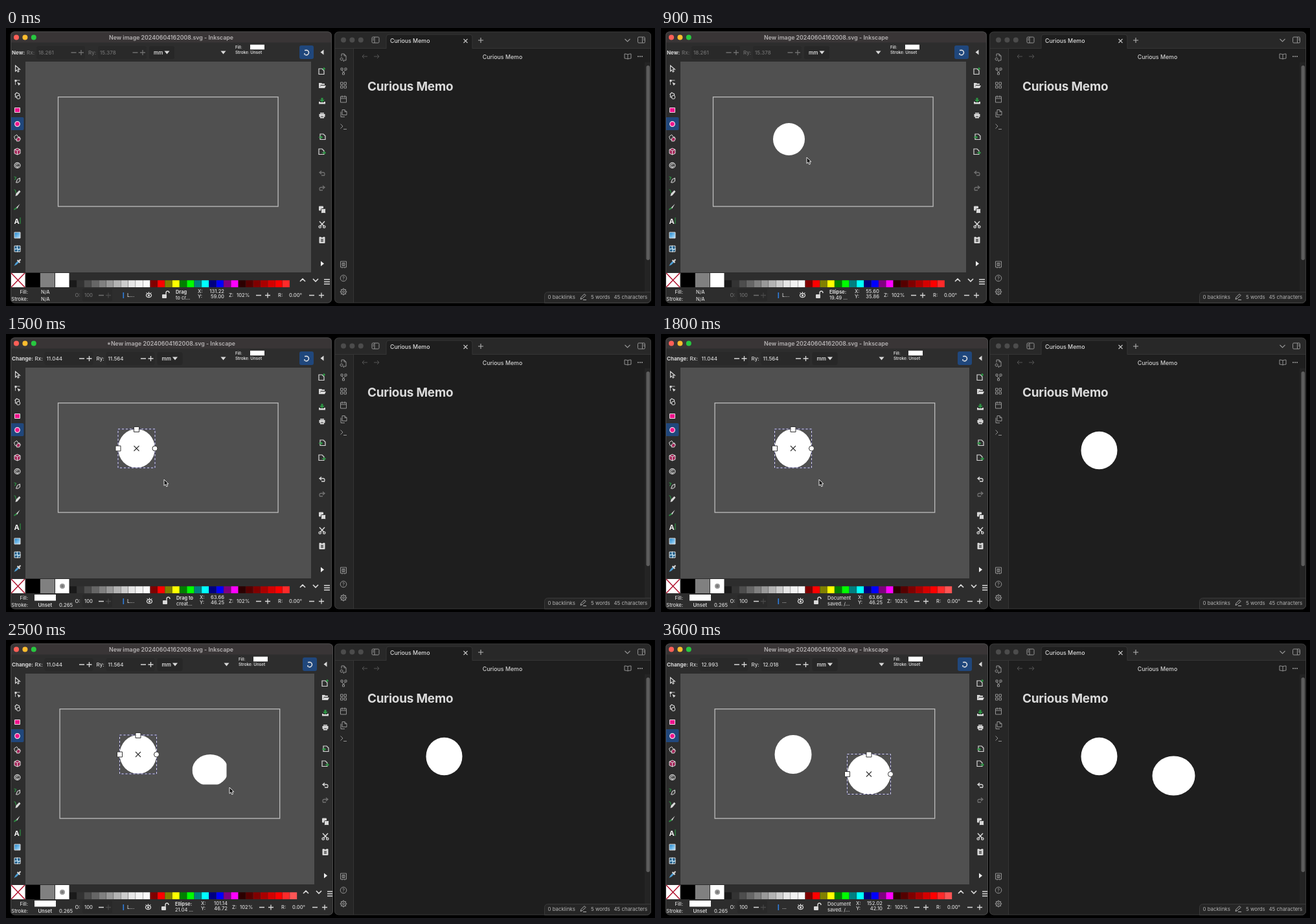
An HTML page with a canvas for the animation above (3.7 s loop, 1002 by 430 pixels).

```html
<!DOCTYPE html>
<html lang="en">
<head>
<meta charset="utf-8">
<title>Live drawing</title>
<style>
html, body { margin: 0; width: 100%; height: 100%; overflow: hidden; background: #000; }
canvas { display: block; width: 1002px; height: 430px; }
</style>
</head>
<body>
<canvas id="stage" width="1002" height="430"></canvas>
<script>
const c = document.getElementById('stage').getContext('2d');
const LOOP = 3700, STEP = 100, MM = 2.58;
const NOTE = 'Curious Memo';
const LIGHT = '#d9d9d9', DIM = '#707070', GREEN = '#2c9142', PINK = '#f0148c';

// Pointer path: [time, x, y]
const path = [
  [100, 345, 222], [200, 245, 172], [300, 172, 146], [400, 172, 146],
  [900, 225, 200], [1000, 233, 210], [1500, 244, 225], [1900, 244, 225],
  [2200, 289, 178], [2500, 345, 228], [2700, 355, 238], [3000, 355, 238],
  [3400, 472, 214], [3500, 492, 208]
];

function pointer(t) {
  if (t < 100) return [418.3, 257.9];
  for (let i = 1; i < path.length; i++) {
    const [t0, x0, y0] = path[i - 1], [t1, x1, y1] = path[i];
    if (t <= t1) {
      const k = (t - t0) / (t1 - t0);
      return [x0 + (x1 - x0) * k, y0 + (y1 - y0) * k];
    }
  }
  return [471.97, 214.3];
}

function box(x, y, w, h, fill, r = 0, stroke) {
  c.beginPath();
  c.roundRect(x, y, w, h, r);
  if (fill) { c.fillStyle = fill; c.fill(); }
  if (stroke) { c.strokeStyle = stroke; c.lineWidth = 1; c.stroke(); }
}

function oval(x, y, rx, ry, fill, stroke, width = 1) {
  c.beginPath();
  c.ellipse(x, y, rx, ry, 0, 0, Math.PI * 2);
  if (fill) { c.fillStyle = fill; c.fill(); }
  if (stroke) { c.strokeStyle = stroke; c.lineWidth = width; c.stroke(); }
}

function draw(d, x, y, stroke, fill, width = 1.2) {
  const p = new Path2D(d);
  c.save();
  c.translate(x, y);
  if (fill) { c.fillStyle = fill; c.fill(p); }
  if (stroke) { c.strokeStyle = stroke; c.lineWidth = width; c.stroke(p); }
  c.restore();
}

function text(s, x, y, size = 7.6, color = LIGHT, weight = 500, align = 'left') {
  c.font = `${weight} ${size}px Inter, sans-serif`;
  c.textAlign = align;
  c.fillStyle = color;
  c.fillText(s, x, y);
}

function plusMinus(x, y, gap, color) {
  draw(`M-4 0H4M${gap - 4} 0h8M${gap} -4v8`, x, y, color, null, 1.3);
}

function trafficLights(x, gap, y, colors) {
  colors.forEach((color, i) => oval(x + i * gap, y, 4, 4, color));
}

function toolIcons() {
  const x = 17.5;
  box(7, 138, 20.5, 20, '#20477c', 2);
  draw('M-3 -5L-3 4L-1 2L1 5L2.5 4L1 1H4Z', x, 63, LIGHT, '#333', 1.1);
  draw('M-4 -4h3v3h-3zM0 0L5 2L2 5Z', x, 84, null, LIGHT);
  draw('M-1 -3H4M-3 -1V4', x, 84, LIGHT, null, .8);
  draw('M-4 -2L-1 -5L3 -3V0M-3 -2V2H0', x, 105, LIGHT);
  oval(x + 1.5, 107, 2.8, 2.8, null, LIGHT);
  box(x - 4, 123.5, 8, 7, PINK, 0, '#f3d9e7');
  oval(x, 148.5, 3.8, 3.8, PINK, '#f3d9e7', 1.3);
  draw('M-1 -5L1 -2L4 -1L2 2L-3 3L-5 -2Z', x, 170, LIGHT, null, 1);
  draw('M1 -1L5 1L3 5H-1L-1 1Z', x, 170, LIGHT, '#a32558', 1);
  draw('M0 -5L4.5 -3V3L0 5L-4.5 3V-3Z', x, 191, LIGHT, '#a32558', 1);
  draw('M-4.5 -3L0 -1L4.5 -3M0 -1V5', x, 191, LIGHT, null, 1);
  oval(x, 212.5, 4.4, 4.1, null, LIGHT, 1.2);
  draw('M2.3 1A2.4 2.4 0 1 1 2 -1.2M0 0L1 .8', x, 212.5, LIGHT, null, 1.1);
  draw('M-5 -4L-2 -3L-4 1', x, 234, GREEN);
  draw('M-2 4L0 -1L4 -3L4 2L1 4Z', x, 235, LIGHT, '#444', 1);
  draw('M-5 -5C-1 -5 -4 0 -1 1', x, 255, GREEN);
  draw('M-3 5L-2 1L3 -4L5 -2L0 4Z', x, 255, null, LIGHT);
  draw('M-3 3L-2 1L4 -5L0 2Z', x, 277, null, LIGHT);
  draw('M-5 4L-1 1', x, 277, GREEN, null, 1.8);
  text('A', x - 5, 302.5, 11, '#f0f0f0', 700);
  draw('M4.5 -5V5', x, 298, GREEN);
  const blend = c.createLinearGradient(13, 316, 22, 325);
  blend.addColorStop(0, '#1681ca');
  blend.addColorStop(1, '#bde6ff');
  box(x - 4.5, 316, 9, 9, blend, 0, LIGHT);
  box(x - 4.5, 337, 9, 9, '#1c5b87', 0, LIGHT);
  draw('M-4 1C-1 -2 1 3 5 0M0 -5C-2 -1 3 0 0 5', x, 341.5, '#d6f1ff');
  draw('M-5 5L-3 1L1 -3L3 -1L-1 3Z', x, 363, null, '#4d9ed4');
  draw('M0 -4L4 0M2 -2L5 -5', x, 363, LIGHT, null, 2);
}

function page(x, y, arrow) {
  draw('M-4 -4H1L4 -1V4.5H-4Z', x, y, LIGHT, '#303030', 1.2);
  draw(arrow, x, y, GREEN, null, 1.7);
}

function commandIcons(x, canUndo) {
  page(x - 1, 67, 'M2 -4H6M4 -6V-2');
  draw('M-5 4V-4H-1L0 -3H4V-1H-2L-4 4ZM-2 0H6L4 4H-4Z', x, 89, null, LIGHT);
  draw('M-5 2V5.5H5V2H3V3H-3V2Z', x, 112, null, LIGHT);
  draw('M-1.5 -4H1.5V-1H4L0 3L-4 -1H-1.5Z', x, 112, null, GREEN);
  draw('M-3 -4H3V-2.5H-3ZM-4.5 -2H4.5V2.5H3V4.5H-3V2.5H-4.5Z', x, 135, null, LIGHT);
  draw('M-2 2H2', x, 135, '#333');
  page(x + 1, 168, 'M-6 1H-1M-3 -1L-1 1L-3 3');
  page(x - 1, 191, 'M1 2H6M4 0L6 2L4 4');
  draw('M-1 -4L-4 -1.5L-1 1M-4 -1.5H2Q5 -1 3.5 3H-1', x, 225, canUndo ? LIGHT : DIM, null, 1.3);
  draw('M1 -4L4 -1.5L1 1M4 -1.5H-2Q-5 -1 -3.5 3H1', x, 248, DIM, null, 1.3);
  box(x - 5, 275.5, 7, 7, LIGHT, 1);
  box(x - 1.5, 279.5, 7, 7, LIGHT, 1, '#333');
  draw('M-4 -5L2.5 2M4 -5L-2.5 2', x, 304, LIGHT, null, 1.5);
  oval(x - 3.3, 307.5, 1.7, 1.7, null, LIGHT, 1.3);
  oval(x + 3.3, 307.5, 1.7, 1.7, null, LIGHT, 1.3);
  box(x - 4.5, 323, 9, 10, LIGHT, 1);
  box(x - 1.5, 322, 3, 2, '#333');
  box(x - 2, 326, 4, 5, '#777');
  draw('M-2 -4L3 0L-2 4Z', x, 364.5, null, '#f0f0f0');
}

function palette(shift) {
  box(8, 379, 21.5, 22, '#fff');
  draw('M0 0L21 22M21 0L0 22', 8, 379, '#b01530', null, 1.5);
  box(30.5, 379, 22, 22, '#000');
  box(53, 379, 22, 22, '#808080');
  box(76, 379, 21.5, 22, '#fff');
  const greys = ['1a', '33', '4d', '66', '80', '99', 'b3', 'cc', 'e6', 'f2', 'f9'].map(g => '#' + g.repeat(3));
  const hues = ['r', 'ry', 'g', 'gb', 'b', 'rb'].flatMap(mix =>
    ['80', 'ff'].map(v => '#' + [...'rgb'].map(ch => mix.includes(ch) ? v : '00').join('')));
  const reds = ['#2b0000', '#550000', '#800000', '#aa0000', '#d40000', '#ff0000', '#ff2a2a'];
  hues[2] = '#808000';
  hues[3] = '#ffff00';
  if (shift) reds.push('#ff5555');
  [...greys, ...hues, ...reds].forEach((color, i) => box(98 + i * 11.34, 390.3, 11, 10.7, color));
  draw('M-4 2L0 -2L4 2M16 -2L20 2L24 -2', 458 + shift, 390, LIGHT, null, 1.7);
  draw('M0 0H9M0 3.5H9M0 7H9', 491 + shift, 389, LIGHT, null, 1.5);
}

function optionBar(s, shift) {
  const d = s.edited ? 12.5 : 0, color = s.edited ? LIGHT : DIM;
  text(s.edited ? 'Change:' : 'New:', 9, 40.5, 8, LIGHT, 700);
  [['Rx:', s.rx, 32], ['Ry:', s.ry, 127]].forEach(([label, value, x]) => {
    box(x + 15 + d, 28, 75, 20, '#292929', 3);
    text(label, x + d, 40.5, 8, color);
    text(value, x + 18 + d, 40.5, 8, color);
    plusMinus(x + 72.5 + d, 38, 11.5, color);
  });
  box(221 + d, 28, 39, 20, '#272727', 3);
  text('mm', 228 + d, 40.5, 8, LIGHT, 600);
  draw('M-4 -2H4L0 3Z', 248.5 + d, 37.5, null, LIGHT);
  draw('M-4 -2H4L0 3Z', 335.5 + shift, 37.5, null, LIGHT);
  text('Fill:', 354 + shift, 31.8, 6.3, LIGHT, 600);
  text('Stroke: Unset', 354 + shift, 39.5, 6.3, LIGHT, 600);
  box(377 + shift, 25.7, 22, 7.6, '#fff');
  box(453 + shift, 27, 22, 21, '#20477c', 3);
  draw('M-1.5 -3.6A3.8 3.8 0 1 1 -2 3.4M-3 -3.6H0M-3 3.4V1', 464 + shift, 38, '#e6e6e6', null, 1.5);
  draw('M2 -4L-3 0L2 4Z', 488.5 + shift, 37.5, null, LIGHT);
}

function statusBar(s, shift) {
  text('Fill:', 34, 410.5, 7.6, LIGHT, 500, 'right');
  text('Stroke:', 34, 422, 7.6, LIGHT, 500, 'right');
  if (s.edited) {
    box(44, 403, 33, 9.5, '#fff');
    text('Unset', 49.5, 422, 7.6, LIGHT, 600);
    text('0.265', 82, 422);
    oval(87, 390, 4, 4, '#999');
    oval(87, 390, 2, 2, '#777');
  } else {
    text('N/A', 54, 410.5);
    text('N/A', 54, 422);
  }
  const color = s.edited ? LIGHT : DIM;
  box(118, 403, 46, 20, '#292929', 3);
  text('O:', 106.5, 416, 7.6, color);
  text('100', 121, 416, 7.6, color);
  draw('M-4 0H4', 147, 413.5, color, null, 1.3);
  draw('M-4 0H4M0 -4V4', 158, 413.5, '#484848', null, 1.3);
  box(180.5, 409, 1.6, 9, '#2f7fe0');
  text(s.saved ? '...' : 'L...', 187, 416);

  const [head, tail, x] = s.message;
  oval(x - 41.5, 413.5, 4, 3, null, LIGHT, 1.3);
  oval(x - 41.5, 413.5, 1.5, 1.5, LIGHT);
  draw('M-4 -5L-2 -3M0 -6V-3M4 -5L2 -3', x - 41.5, 414, LIGHT, null, 1);
  box(x - 21, 412, 7, 6, LIGHT, 1);
  draw('M0 0V-2Q0 -5 2.5 -5T5 -2', x - 15, 412, LIGHT, null, 1.4);
  text(head, x, 411, 7.4, LIGHT, s.saved ? 500 : 700);
  text(tail, x, 419.5, 7.4);

  const right = 337 + shift;
  const coord = (label, value, y) => {
    text(value, right, y, 7.6, LIGHT, 500, 'right');
    text(label, right - (s.px >= 100 ? 41 : 38), y, 7.6);
  };
  coord('X:', s.px.toFixed(2), 409.5);
  coord('Y:', s.py.toFixed(2), 418);
  text('Z:', 344 + shift, 416, 7.6);
  text('102%', 356 + shift, 416, 7.6);
  plusMinus(390 + shift, 413.5, 14, LIGHT);
  text('R:', 420 + shift, 416, 7.6);
  text('0.00°', 437 + shift, 416, 7.6);
  plusMinus(472 + shift, 413.5, 15, LIGHT);
}

function selection(x, y, rx, ry) {
  c.save();
  c.lineWidth = 1;
  c.strokeStyle = '#494777';
  c.strokeRect(x - rx, y - ry, rx * 2, ry * 2);
  c.setLineDash([3, 3]);
  c.strokeStyle = '#d8d7f2';
  c.strokeRect(x - rx, y - ry, rx * 2, ry * 2);
  c.restore();
  draw('M-4 -4L4 4M4 -4L-4 4', x, y, '#333', null, 1.1);
  box(x - 4, y - ry - 3.5, 8, 8, '#fff', 0, '#333');
  box(x - rx - 4, y - 4, 8, 8, '#fff', 0, '#333');
  oval(x + rx, y, 4, 4, '#fff', '#333');
}

function editor(s, shift) {
  const w = shift ? 498 : 496;
  c.save();
  c.beginPath();
  c.roundRect(7, 5.5, w, 420, 6);
  c.clip();
  box(7, 5, w, 421, '#2d2d2d');
  box(7, 5, w, 17.5, '#393536');
  trafficLights(16, 13.4, 14.5, ['#ff5f57', '#febc2e', '#28c840']);
  text((s.dirty ? '*' : '') + 'New image 20240604162008.svg - Inkscape', 255, 17.5, 8.8, '#b5b2b3', 600, 'center');
  optionBar(s, shift);
  box(30, 52, 441 + shift, 326, '#505050');
  c.strokeStyle = '#bdbdbd';
  c.lineWidth = 1.3;
  c.strokeRect(80.5 + (shift ? 2.6 : 0), 106.7, 339.6, 169.3);
  s.ovals.forEach(([x, y, rx, ry]) => oval(x, y, rx, ry, '#fff'));
  if (s.draft) {
    const [x, y, rx, ry] = s.draft;
    c.save();
    c.beginPath();
    c.rect(x - rx, y - ry, rx * 2 - s.trim, ry * 2 - s.trim);
    c.clip();
    oval(x, y, rx, ry, '#fff');
    c.restore();
  }
  if (s.selected) selection(...s.selected);
  toolIcons();
  commandIcons(488 + shift, s.edited);
  palette(shift);
  statusBar(s, shift);
  c.restore();
  box(7.5, 6, w - 1, 419, null, 6, '#484848');
}

function noteApp(s) {
  const grey = '#939393';
  box(507, 6, 489, 419, '#1e1e1e', 6);
  box(507, 6, 489, 26, '#282828', [6, 6, 0, 0]);
  box(507, 31, 29.5, 394, '#262626', [0, 0, 0, 6]);
  box(507, 31, 489, 1, '#353535');
  box(536, 32, 1, 393, '#353535');
  box(587, 10, 133, 22, '#1e1e1e', [5, 5, 0, 0]);
  draw('M0 22V5Q0 0 5 0H128Q133 0 133 5V22', 587, 10, '#353535', null, 1);
  trafficLights(521, 13.4, 18.5, ['#4c4c4c', '#4c4c4c', '#4c4c4c']);
  box(565, 14, 11, 9, null, 1.5, grey);
  draw('M4 0V9M1.5 2.5H3M1.5 4.5H3', 565, 14, grey, null, 1);
  text(NOTE, 593, 23, 8.8, '#dadada', 500);
  draw('M-3 -3L3 3M3 -3L-3 3', 709.5, 20, '#c4c4c4', null, 1.1);
  draw('M-4 0H4M0 -4V4', 733, 19, '#b5b5b5', null, 1.1);
  draw('M-4 -2L0 2L4 -2', 959.5, 19, grey);
  box(975.5, 14, 11, 9, null, 1.5, grey);
  draw('M7 0V9M8.5 2.5H10M8.5 4.5H10', 975.5, 14, grey, null, 1);

  draw('M4 0H-4M-1 -3L-4 0L-1 3', 554, 44, '#555', null, 1);
  draw('M-4 0H4M1 -3L4 0L1 3', 572, 44, '#555', null, 1);
  text(NOTE, 766.5, 47.5, 8.8, '#cfcfcf', 500, 'center');
  draw('M0 -3Q-2 -4 -5 -4V3Q-2 3 0 4Q2 3 5 3V-4Q2 -4 0 -3V4', 960, 44, grey, null, 1);
  [-3, 0, 3].forEach(x => oval(979 + x, 44, .9, .9, '#b0b0b0'));

  const side = (d, y) => draw(d, 521, y, grey, null, 1);
  side('M-3 -1V-5H1L4 -2V5H0M1 -5V-2H4M-3 1A2 2 0 1 0 -2.9 1M-1 5L1 7', 45);
  side('M-4 -5H-1V-2H-4ZM2 -5H5V-2H2ZM-1.5 2H1.5V5H-1.5ZM-2.5 -2Q0 1 0 2M3 -2Q0 1 0 2', 67);
  side('M-4.5 -4.5H-1V-1H-4.5ZM1 -4.5H4.5V-1H1ZM-4.5 1H-1V4.5H-4.5ZM1 1H4.5V4.5H1Z', 88.5);
  side('M-4.5 -4H4.5V5H-4.5ZM-4.5 -1H4.5M-2 -5.5V-2.5M2 -5.5V-2.5', 110);
  side('M-2 -5H2L5 -2V3H-2ZM2 -5V-2H5M-4 -2V6H2', 131.5);
  side('M-4.5 -4L-1 -.5L-4.5 3M0 4H5', 152.5);
  side('M-4.5 -4.5H4.5V4.5H-4.5ZM-2 -2H2V2H-2ZM0 -2V2M-2 4.5V6M2 4.5V6', 365.5);
  oval(521, 387, 4.8, 4.8, null, grey);
  text('?', 521, 390, 7.5, grey, 500, 'center');
  oval(521, 408, 3.8, 3.8, null, grey, 1.3);
  oval(521, 408, 1.5, 1.5, null, grey);
  for (let i = 0; i < 8; i++) {
    const a = i * Math.PI / 4;
    draw(`M${4 * Math.cos(a)} ${4 * Math.sin(a)}L${5.4 * Math.cos(a)} ${5.4 * Math.sin(a)}`, 521, 408, grey);
  }

  c.letterSpacing = '-0.2px';
  text(NOTE, 558, 97, 18.9, '#dadada', 700);
  c.letterSpacing = '0px';
  if (s.synced > 0) oval(676.5, 180, 28, 29.3, '#fff');
  if (s.synced > 1) oval(791.5, 210, 33, 30.5, '#fff');

  box(986, 53, 10, 355, '#242424');
  box(988.5, 58, 5.5, 301, '#5c5c5c', 3);
  box(831.5, 408.5, 164, 17, '#262626', [5, 0, 6, 0], '#3a3a3a');
  text('0 backlinks', 836.5, 419, 7.9, '#b3b3b3', 400);
  draw('M-4 3L-3 0L2 -5L4 -3L-1 2ZM0 4H5', 891, 416.5, '#b3b3b3', null, 1);
  text('5 words', 903, 419, 7.9, '#b3b3b3', 400);
  text('45 characters', 938.5, 419, 7.9, '#b3b3b3', 400);
  box(507.5, 6, 488, 419, null, 6, '#3b3b3b');
}

function dragOval(x, y, [px, py], lag) {
  const w = Math.max(1, px - lag - x), h = Math.max(1, py - lag - y);
  return [x + w / 2, y + h / 2, w / 2, h / 2];
}

function sceneAt(t) {
  const at = pointer(t), edited = t >= 1100, second = t >= 2800;
  const shift = t >= 1700 ? 5 : 0;
  const first = [201.5 + (shift ? 2.5 : 0), 177, 28.5, 30], other = [321, 207.5, 33.5, 31];
  const s = {
    edited, ovals: [], draft: null, selected: null, trim: 0,
    rx: second ? '12.993' : edited ? '11.044' : '18.261',
    ry: second ? '12.018' : edited ? '11.564' : '15.378',
    dirty: edited && t < 1700 || second && t < 3000,
    saved: t >= 1700 && t < 2000 || t >= 3000,
    synced: t >= 3100 ? 2 : t >= 1800 ? 1 : 0
  };
  if (edited) {
    s.ovals.push(first);
    s.selected = first;
  }
  if (second) {
    s.ovals.push(other);
    s.selected = other;
  }
  if (t >= 500 && t <= 1000) s.draft = dragOval(173, 147, at, 3);
  if (t >= 2300 && t < 2800) {
    s.draft = dragOval(287.5, 177, at, 2);
    s.trim = t <= 2500 ? 2.5 : 0;
  }
  // While dragging, the readout trails the pointer
  const trail = s.draft ? 1.8 + s.trim : 0;
  s.px = 63.66 + (at[0] - trail - 244) / MM;
  s.py = 46.25 + (at[1] - Math.min(trail, 1.8) - 225) / MM;
  if (s.draft) {
    const width = (s.draft[2] * 2 - s.trim) / MM + .5;
    s.message = ['Ellipse:', width.toFixed(2) + ' ...', shift ? 261 : 260];
  } else if (s.saved) {
    s.message = ['Document', 'saved. /...', 257];
  } else {
    s.message = edited ? ['Drag to', 'creat...', 263] : ['Drag', 'to cr...', 262];
  }
  return { s, shift, at };
}

function render(t) {
  const { s, shift, at } = sceneAt(t);
  box(0, 0, 1002, 430, '#000');
  editor(s, shift);
  noteApp(s);
  if (t >= 100 && t <= 3500) {
    draw('M0 0V9.5L2.2 7.6L3.8 11L5.6 10.2L4 6.9H7Z', ...at, '#e8e8e8', '#111', 1);
  }
}

const start = performance.now();
function tick() {
  const t = (performance.now() - start) % LOOP;
  render(Math.floor(t / STEP) * STEP);
  requestAnimationFrame(tick);
}
tick();
</script>
</body>
</html>
```
